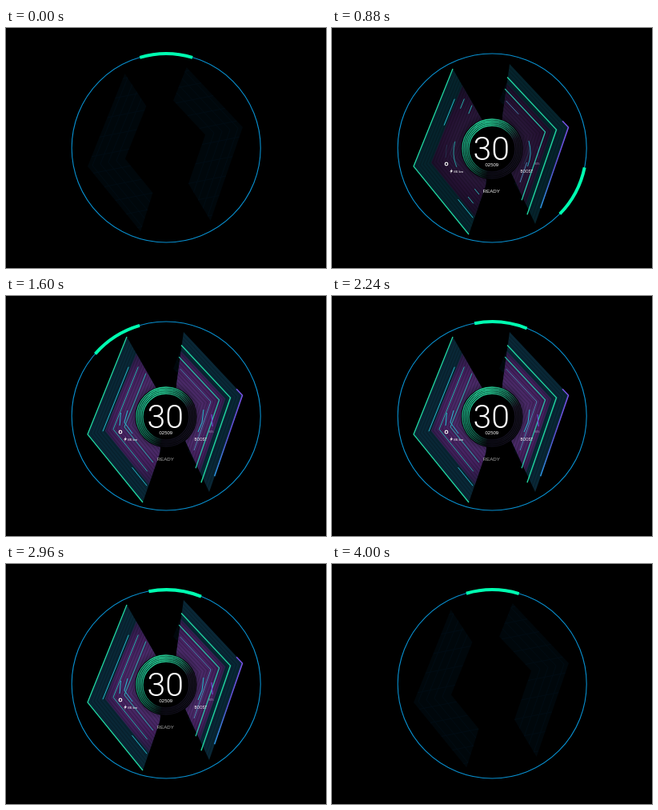
An HTML page with a canvas that plays this animation: 400 by 300 pixels, repeating every 4040 ms.

```html
<!DOCTYPE html>
<html lang="en">
<head>
<meta charset="utf-8">
<title>Gauge</title>
<style>
html, body { margin: 0; width: 100%; height: 100%; overflow: hidden; background: #000; }
canvas { display: block; width: 400px; height: 300px; }
</style>
</head>
<body>
<canvas id="stage" width="400" height="300"></canvas>
<script>
const ctx = document.getElementById('stage').getContext('2d');
const LOOP = 4040, STEP = 40, RAD = Math.PI / 180;
const GREEN = '#20d5a0', TEAL = '#27abaa', CYAN = '#24bccd', PURPLE = '#7951e8';
const SANS = '"Liberation Sans", Arial, sans-serif';

// Time in ms, clockwise angle of the marker in degrees.
const SPIN = [[360, 0], [640, 21], [880, 118], [1180, 250], [1480, 308], [1600, 327.5],
  [1900, 352], [2240, 365.4], [2600, 368], [2960, 365.6], [3200, 346], [3440, 299.7],
  [3720, 41.6], [4000, 0.3]];

// Each chevron steps inward from its outer corner.
const LEFT = { x: 102, y: 173, dir: 1, up: [49, -122], down: [69, 85],
  shape: [[151, 51], [102, 173], [171, 258], [192, 197], [198, 150], [187, 114]] };
const RIGHT = { x: 296, y: 124, dir: -1, up: [-74, -79], down: [-42, 122],
  shape: [[222, 45], [296, 124], [254, 245], [225, 183], [212, 150], [213, 111]] };

const clamp = v => Math.max(0, Math.min(1, v));
const ramp = (t, a, b) => { const p = clamp((t - a) / (b - a)); return p * p * (3 - 2 * p); };
const pulse = (t, a, b, c, d) => ramp(t, a, b) * (1 - ramp(t, c, d));

// Monotone cubic interpolation.
function follow(keys, t) {
  const last = keys.length - 1;
  if (t <= keys[0][0]) return keys[0][1];
  if (t >= keys[last][0]) return keys[last][1];
  const slope = i => (keys[i + 1][1] - keys[i][1]) / (keys[i + 1][0] - keys[i][0]);
  const tangent = i => {
    if (i === 0 || i === last) return 0;
    const a = slope(i - 1), b = slope(i);
    return a * b <= 0 ? 0 : 2 * a * b / (a + b);
  };
  let i = 0;
  while (t >= keys[i + 1][0]) i++;
  const span = keys[i + 1][0] - keys[i][0], p = (t - keys[i][0]) / span, q = 1 - p;
  return (1 + 2 * p) * q * q * keys[i][1] + p * q * q * span * tangent(i)
    + p * p * (3 - 2 * p) * keys[i + 1][1] - p * p * q * span * tangent(i + 1);
}

function trace(points, close) {
  ctx.beginPath();
  points.forEach(([x, y]) => ctx.lineTo(x, y));
  if (close) ctx.closePath();
}

function stroke(points, color, width = 1) {
  trace(points);
  ctx.strokeStyle = color;
  ctx.lineWidth = width;
  ctx.stroke();
}

function arc(x, y, r, from, to, color, width) {
  ctx.beginPath();
  ctx.arc(x, y, r, from * RAD, to * RAD);
  ctx.strokeStyle = color;
  ctx.lineWidth = width;
  ctx.stroke();
}

const corner = (side, d) => [side.x + side.dir * d, side.y - side.dir * d * 0.2];
const along = ([x, y], [dx, dy], k) => [x + dx * k, y + dy * k];
const chevron = (side, d, u, v) => {
  const c = corner(side, d);
  return [along(c, side.up, u), c, along(c, side.down, v)];
};

function arm(side, d, dir, from, to, color, width = 1) {
  const c = corner(side, d);
  stroke([along(c, dir, from), along(c, dir, to)], color, width);
}

// Two arms that grow from their outer ends towards the corner.
function growing(side, d, u, v, amount, color) {
  arm(side, d, side.up, u, u * (1 - amount), color);
  arm(side, d, side.down, v, v * (1 - amount), color);
}

function label(text, x, y, size, color = '#fff', align = 'center', weight = 400, family = SANS) {
  ctx.font = `${weight} ${size}px ${family}`;
  ctx.textAlign = align;
  ctx.textBaseline = 'alphabetic';
  ctx.fillStyle = color;
  ctx.fillText(text, x, y);
}

function ghost(side) {
  const outer = chevron(side, 0, 0.95, 0.96), inner = chevron(side, 47, 0.54, 0.5);
  trace([...outer, ...inner.reverse()], true);
  ctx.fillStyle = '#00070b';
  ctx.fill();
  ctx.save();
  ctx.clip();
  for (let d = 6; d < 46; d += 10) stroke(chevron(side, d, 1, 1), '#000c14');
  for (let k = 0.1; k < 1; k += 0.2) {
    for (const dir of [side.up, side.down]) {
      stroke([along(corner(side, 0), dir, k), along(corner(side, 47), dir, k)], '#000c14');
    }
  }
  ctx.restore();
}

function panel(side, detail) {
  const light = 0.45 + 0.55 * detail;
  const tone = (r, g, b) => `rgb(${r * light},${g * light},${b * light})`;
  ctx.save();
  trace(side.shape, true);
  ctx.clip();
  ctx.fillStyle = `rgb(${4 + 5 * detail},${34 + 5 * detail},${42 + 12 * detail})`;
  ctx.fillRect(80, 30, 240, 240);
  trace(chevron(side, 22, 1.2, 1.2), true);
  const glow = ctx.createRadialGradient(200, 150, 36, 200, 150, 100);
  glow.addColorStop(0, tone(52, 32, 76));
  glow.addColorStop(0.15, tone(74, 42, 104));
  glow.addColorStop(0.4, tone(68, 32, 94));
  glow.addColorStop(0.7, tone(46, 28, 74));
  glow.addColorStop(1, tone(20, 36, 58));
  ctx.fillStyle = glow;
  ctx.fill();
  for (let d = 4; d < 85; d += 4) stroke(chevron(side, d, 1.2, 1.2), 'rgba(0,0,0,.2)', 1.2);
  ctx.restore();
}

function lines(detail) {
  const inner = 0.3 + 0.7 * detail;
  stroke(chevron(LEFT, 0, 1, 1), GREEN, 1.3);
  arm(LEFT, 19, LEFT.up, 0.66, 0.66 * (1 - inner), CYAN);
  arm(LEFT, 19, LEFT.down, 0.53, 0.8, CYAN);
  growing(LEFT, 32, 0.64, 0.62, detail, TEAL);
  growing(LEFT, 46, 0.55, 0.52, detail, TEAL);

  stroke(chevron(RIGHT, 15.5, 0.83, 0.87), GREEN, 1.4);
  stroke(chevron(RIGHT, 29.5, 0.68, 0.7), '#27c0a5', 1.3);
  growing(RIGHT, 40, 0.52, 0.5, inner, '#4a83ab');

  const c = corner(RIGHT, 0.5), end = along(c, RIGHT.down, 0.83);
  const fade = ctx.createLinearGradient(c[0], c[1], end[0], end[1]);
  fade.addColorStop(0, PURPLE);
  fade.addColorStop(0.5, '#5a50d0');
  fade.addColorStop(1, '#2795e0');
  stroke([along(c, RIGHT.up, 0.1), c, end], fade, 1.5);
}

function dial(detail) {
  ctx.beginPath();
  ctx.arc(200, 151, 38.5, 0, 2 * Math.PI);
  ctx.fillStyle = '#000';
  ctx.fill();
  const sweep = ctx.createConicGradient(100 * RAD, 200, 151);
  sweep.addColorStop(0, '#0a0c14');
  sweep.addColorStop(0.1, '#126650');
  sweep.addColorStop(0.25, '#1fb58a');
  sweep.addColorStop(0.45, '#27d69b');
  sweep.addColorStop(0.56, '#1a8063');
  sweep.addColorStop(0.66, '#1b1628');
  sweep.addColorStop(1, '#0c0b16');
  for (let r = 29; r <= 37; r += 2) arc(200, 151, r, 0, 360, sweep, 1.3);

  const base = ctx.globalAlpha;
  ctx.globalAlpha = base * (1 - detail);
  arc(200, 155, 48, 157, 196, TEAL, 1);
  arc(200, 155, 48, -17, 22, CYAN, 1);
  ctx.globalAlpha = base * detail;
  stroke([[143.5, 146], [142, 162]], CYAN);
  stroke([[152, 143], [148, 158], [158, 172]], CYAN);
  stroke([[247, 142], [245, 158], [240, 170]], CYAN);
  stroke([[257, 148], [258, 163]], PURPLE);
  ctx.globalAlpha = base;
}

function labels(detail) {
  const shade = Math.round(255 - 85 * detail);
  label('30', 199.3, 165, 41, '#fff', 'center', 300, 'Roboto, sans-serif');
  label('02509', 199.8, 173.3, 6);
  label('READY', 199.2, 206.3, 6.2, `rgb(${shade},${shade},${shade})`);
  label('BOOST', 243.3, 180.5, 4.5);
  label('86 km', 152.3, 180.5, 4.4, '#fff', 'left');
  label('80%', 256.5, 171, 3, '#a7a0c0');
  arc(143, 170, 1.8, 0, 360, '#eee', 1.2);
  trace([[150, 176], [147.3, 179.5], [149, 179.5], [148, 182], [151, 178.3], [149.3, 178.3]], true);
  ctx.fillStyle = '#fff';
  ctx.fill();
}

function draw(t) {
  const show = pulse(t, 390, 860, 3420, 3720);
  const detail = pulse(t, 680, 1480, 3120, 3600);
  ctx.globalAlpha = 1;
  ctx.fillStyle = '#000';
  ctx.fillRect(0, 0, 400, 300);
  ghost(LEFT);
  ghost(RIGHT);
  if (show > 0) {
    ctx.globalAlpha = show;
    panel(LEFT, detail);
    panel(RIGHT, detail);
    lines(detail);
    dial(detail);
    labels(detail);
    ctx.globalAlpha = 1;
  }
  arc(200.2, 150, 118, 0, 360, '#0890d0', 1.1);
  const angle = follow(SPIN, t) - 90;
  arc(200.2, 150.2, 118, angle - 16.2, angle + 16.2, '#00ffb1', 4);
}

const start = performance.now();
function tick() {
  const t = (performance.now() - start) % LOOP;
  draw(Math.floor(t / STEP) * STEP);
  requestAnimationFrame(tick);
}
tick();
</script>
</body>
</html>
```
